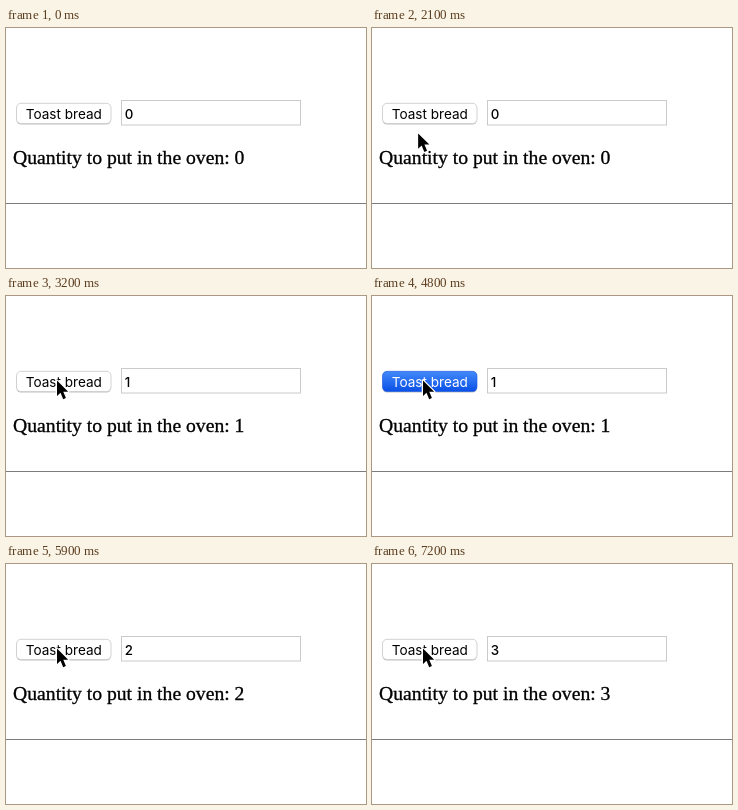
An HTML page that plays this animation: 360 px wide and 240 px high, repeating every 8 s.

```html
<!DOCTYPE html>
<html lang="en">
<head>
<meta charset="utf-8">
<title>Toast counter</title>
<style>
  html, body { margin: 0; width: 100%; height: 100%; overflow: hidden; background: #fff; }
  svg { display: block; width: 100%; height: 100%; }
  .ui { font: 13.55px Inter, sans-serif; }
  #value { font-size: 13.3px; font-weight: 500; }
  .body { font: 19.65px "Liberation Serif", serif; stroke: #000; stroke-width: 0.3; }
</style>
</head>
<body>
<svg viewBox="0 0 360 240">
  <defs>
    <linearGradient id="blue" x2="0" y2="1">
      <stop offset="0" stop-color="#4389fa"/>
      <stop offset="1" stop-color="#0a50e6"/>
    </linearGradient>
  </defs>
  <rect width="360" height="240" fill="#fff"/>
  <rect x="10.5" y="75.7" width="94.5" height="20.8" rx="4.5" fill="#c0c0c0"/>
  <rect id="button" x="10.5" y="75.3" width="94.5" height="20.2" rx="4.5"/>
  <text id="label" class="ui" x="19.8" y="91.1">Toast bread</text>
  <rect x="115.5" y="72.5" width="179" height="24.5" fill="#fff" stroke="#cacaca"/>
  <text id="value" class="ui" x="118.7" y="91.1"></text>
  <text id="line" class="body" x="7.1" y="136.4"></text>
  <rect y="175" width="360" height="1" fill="#7c7c7c"/>
  <path id="cursor" d="M0 0V15.4L3.5 12.1L6.2 18.6L8.9 17.4L6.3 11.2H11.2Z"
        fill="#000" stroke="#fff" stroke-width="2.6" stroke-linejoin="round" paint-order="stroke"/>
</svg>
<script>
  const LOOP = 8000, STEP = 100;
  const CLICKS = [[3100, 3200], [4800, 4900], [7000, 7200]];
  const [button, label, value, line, cursor] =
    ["button", "label", "value", "line", "cursor"].map(id => document.getElementById(id));

  const mix = (a, b, k) => a + (b - a) * k;
  const progress = (t, from, to) => Math.min(1, Math.max(0, (t - from) / (to - from)));

  function pointer(t) {
    const rest = 1 - progress(t, 1600, 2400);
    const settle = progress(t, 2400, 2700);
    return [
      mix(41, 48.8, 1 - rest ** 1.1) + 2.2 * settle,
      mix(155, 90.6, 1 - rest ** 1.5) - 6 * settle
    ];
  }

  function draw(t) {
    const pressed = CLICKS.some(([down, up]) => t >= down && t < up);
    const count = CLICKS.filter(([, up]) => t >= up).length;
    button.setAttribute("fill", pressed ? "url(#blue)" : "#fff");
    button.setAttribute("stroke", pressed ? "#1a5ae0" : "#cfcfcf");
    button.setAttribute("stroke-width", pressed ? 0.6 : 0.9);
    label.setAttribute("fill", pressed ? "#fff" : "#000");
    value.textContent = count;
    line.textContent = `Quantity to put in the oven: ${count}`;
    cursor.setAttribute("visibility", t < 1600 ? "hidden" : "visible");
    cursor.setAttribute("transform", `translate(${pointer(t)})`);
  }

  const start = performance.now();
  function tick() {
    const t = (performance.now() - start) % LOOP;
    draw(Math.floor(t / STEP) * STEP);
    requestAnimationFrame(tick);
  }
  tick();
</script>
</body>
</html>
```
